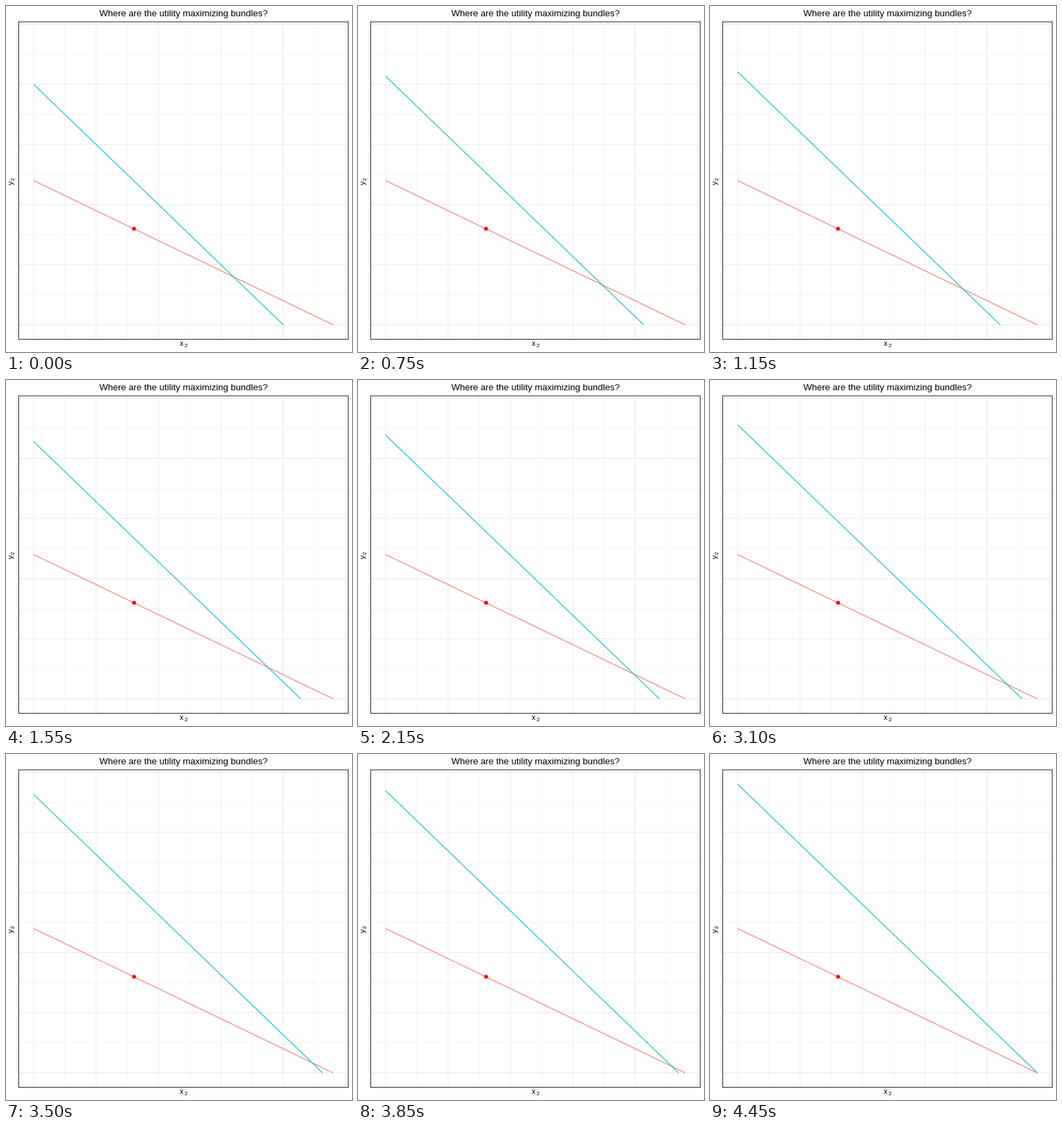
These frames come from a looping animation (504 px wide and 504 px high, 5 s). A matplotlib script:

```python
import matplotlib.pyplot as plt
from matplotlib.animation import FuncAnimation

SIZE, DPI = 504, 72
LEFT, RIGHT, TOP, BOTTOM = 18.5, 498.5, 23.1, 485.5
FRAMES, STEPS, INTERVAL = 100, 89, 50
LINE = 1.07

plt.rcParams.update({
    "font.family": "Liberation Sans",
    "path.snap": False,
    "lines.solid_capstyle": "butt",
    "lines.linewidth": LINE,
    "toolbar": "None",
})

fig = plt.figure(figsize=(SIZE / DPI, SIZE / DPI), dpi=DPI, facecolor="white")
ax = fig.add_axes([LEFT / SIZE, 1 - BOTTOM / SIZE,
                   (RIGHT - LEFT) / SIZE, (BOTTOM - TOP) / SIZE])
ax.set(xlim=(-0.24, 5.04), ylim=(-0.24, 5.04), xticks=[], yticks=[])
for spine in ax.spines.values():
    spine.set(color="#333333", linewidth=LINE)


def grid(values, width):
    for v in values:
        ax.axvline(v, color="#ebebeb", linewidth=width, zorder=0)
        ax.axhline(v, color="#ebebeb", linewidth=width, zorder=0)


def label(x, y, text, size, **kwargs):
    """Place text with its baseline at pixel (x, y), measured from the top left."""
    fig.text(x / SIZE, 1 - y / SIZE, text, fontsize=size, color="black",
             va="baseline", **kwargs)


grid([i + 0.5 for i in range(5)], LINE / 2)
grid(range(6), LINE)

label(258.5, 15.2, "Where are the utility maximizing bundles?", 13.2, ha="center")
label(253.2, 495.2, "x", 11)
label(259.1, 497, "2", 8.2)
vertical = dict(rotation=90, ha="right", rotation_mode="anchor")
label(11.2, 254.3, "y", 11, **vertical)
label(13, 249.2, "2", 8.2, **vertical)

ax.plot([0, 4.8], [2.4, 0], color="#f8766d", zorder=3)
budget, = ax.plot([], [], color="#00bfc4", zorder=4)
ax.plot(1.6, 1.6, "o", color="red", markersize=5.7, markeredgewidth=0, zorder=5)


def update(frame):
    reach = 4 + 0.8 * min(frame, STEPS) / STEPS
    budget.set_data([0, reach], [reach, 0])
    return budget,


animation = FuncAnimation(fig, update, frames=FRAMES, interval=INTERVAL,
                          repeat=True, repeat_delay=0)
plt.show()
```
